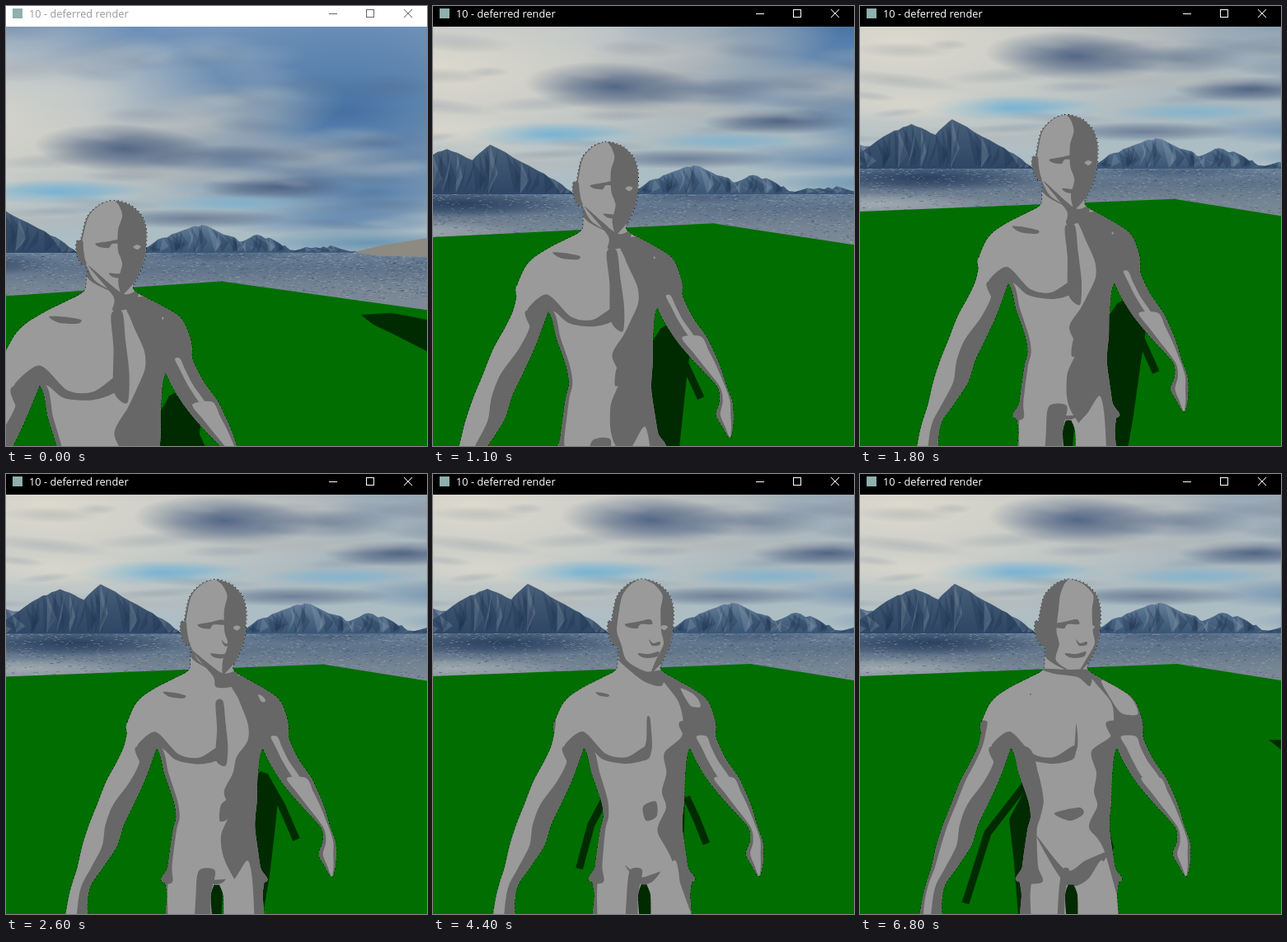
These frames come from a looping animation (511x533 px, 6900 ms). An HTML page with a canvas:

```html
<!DOCTYPE html>
<html>
<head>
<meta charset="utf-8">
<style>
html, body { margin: 0; width: 100%; height: 100%; overflow: hidden; background: #000; }
canvas { display: block; }
</style>
</head>
<body>
<canvas id="stage" width="511" height="533"></canvas>
<script>
const ctx = document.getElementById('stage').getContext('2d');
const LOOP = 6900, STEP = 100, FOCAL = 408, CX = 255.5, CY = 279, REST = 192;
const LIGHT = '#999a99', DARK = '#666766', GRASS = '#006e00', SHADE = '#002b00';

// time, yaw, height of the horizon on screen
const camKeys = [[0, .292, 298], [500, .292, 298], [600, .19, 262], [1100, .102, 227],
  [1800, .008, 196], [2700, 0, REST], [LOOP, 0, REST]];
let cam, light; // light runs from 0 to 1

const mix = (a, b, k) => a + (b - a) * k;
const clamp = k => Math.min(1, Math.max(0, k));
const linear = k => k, easeIn = k => k * k, easeOut = k => 1 - (1 - k) ** 2;
const pitchFor = horizon => Math.atan((horizon - CY) / FOCAL);

function camera(t) {
  const i = camKeys.findIndex(k => k[0] > t), a = camKeys[i - 1], b = camKeys[i];
  const k = (t - a[0]) / (b[0] - a[0]), yaw = mix(a[1], b[1], k), pitch = pitchFor(mix(a[2], b[2], k));
  return { sy: Math.sin(yaw), cy: Math.cos(yaw), sp: Math.sin(pitch), cp: Math.cos(pitch) };
}

// Points are given as seen by the camera at rest; turn them to the current view.
const S = Math.sin(pitchFor(REST)), C = Math.cos(pitchFor(REST));
function project(x, y) {
  const u = x - CX, v = CY - y;
  const h = v * C + FOCAL * S, d = FOCAL * C - v * S;
  const x2 = u * cam.cy - d * cam.sy, d2 = d * cam.cy + u * cam.sy;
  const depth = d2 * cam.cp + h * cam.sp;
  return [CX + FOCAL * x2 / depth, CY - FOCAL * (h * cam.cp - d2 * cam.sp) / depth];
}

function points(flat) {
  const out = [];
  for (let i = 0; i < flat.length; i += 2) out.push(project(flat[i], flat[i + 1]));
  return out;
}

function spline(flat, path = new Path2D()) {
  const p = points(flat), n = p.length, at = i => p[(i + n) % n];
  path.moveTo(...p[0]);
  for (let i = 0; i < n; i++) {
    const [a, b, c, d] = [at(i - 1), at(i), at(i + 1), at(i + 2)];
    path.bezierCurveTo(b[0] + (c[0] - a[0]) / 7, b[1] + (c[1] - a[1]) / 7,
      c[0] - (d[0] - b[0]) / 7, c[1] - (d[1] - b[1]) / 7, c[0], c[1]);
  }
  path.closePath();
  return path;
}

function trace(flat) {
  ctx.beginPath();
  points(flat).forEach(p => ctx.lineTo(...p));
}

function poly(flat, color) {
  trace(flat);
  ctx.fillStyle = color;
  ctx.fill();
}

const morph = (from, to, k) => from.map((v, i) => mix(v, to[i], k));

function random(seed) {
  return () => (seed = (seed * 16807) % 2147483647) / 2147483647;
}

function puff(x, y, rx, ry, rgb, alpha, tilt = 0) {
  const g = ctx.createRadialGradient(0, 0, 0, 0, 0, 1);
  g.addColorStop(0, `rgba(${rgb},${alpha})`);
  g.addColorStop(.5, `rgba(${rgb},${alpha * .6})`);
  g.addColorStop(1, `rgba(${rgb},0)`);
  ctx.save();
  ctx.translate(...project(x, y));
  ctx.rotate(tilt);
  ctx.scale(rx, ry);
  ctx.fillStyle = g;
  ctx.fillRect(-1, -1, 2, 2);
  ctx.restore();
}

function verticalFill(y0, y1, colors) {
  const g = ctx.createLinearGradient(0, project(255, y0)[1], 0, project(255, y1)[1]);
  colors.forEach((c, i) => g.addColorStop(i / (colors.length - 1), c));
  return g;
}

const BLUE = '64,112,166', CREAM = '222,218,206', SLATE = '78,98,130', CYAN = '110,176,212', GREY = '178,182,182';
const clouds = [
  [620, -50, 310, 140, BLUE, .95], [200, -115, 170, 45, BLUE, .45],
  [50, 40, 380, 150, CREAM, .95], [380, 5, 170, 50, GREY, .7, -.2], [560, 45, 150, 32, GREY, .7, .15],
  [650, 95, 130, 50, BLUE, .6], [265, 56, 110, 30, SLATE, .95, .05], [390, 60, 90, 18, SLATE, .5],
  [480, 96, 95, 16, SLATE, .95], [350, 86, 140, 13, GREY, .7], [190, 119, 110, 15, CYAN, .85],
  [410, 124, 100, 11, CYAN, .6], [60, 115, 120, 22, CREAM, .7], [560, 145, 150, 20, BLUE, .5],
  [350, 148, 120, 12, SLATE, .65], [150, 155, 150, 14, GREY, .6], [620, 178, 150, 16, '92,140,174', .8]
];

function sky() {
  ctx.fillStyle = verticalFill(-120, REST, ['#7f9cbd', '#9db0c0', '#b0b9bd', '#a9b8bf', '#aebfc6']);
  ctx.fillRect(0, 25, 511, 508);
  clouds.forEach(c => puff(...c));
  const r = random(77);
  for (let i = 0; i < 90; i++) {
    const y = -130 + r() * 300, rx = 25 + r() * 60;
    puff(-40 + r() * 780, y, rx, 4 + rx * (190 - y) / 1500, r() < .5 ? '212,212,206' : SLATE, .17, (r() - .5) * .2);
  }
}

function sea() {
  ctx.fillStyle = verticalFill(REST, 250, ['#6a8198', '#5f7389', '#748393', '#7d8995']);
  ctx.fillRect(0, project(255, REST)[1], 511, 533);
  puff(80, 204, 150, 17, '36,58,90', .9);
  puff(380, 197, 110, 8, '60,82,112', .6);
  puff(20, 236, 150, 14, '176,184,188', .7);
  const r = random(5);
  for (let i = 0; i < 2600; i++) {
    const [px, py] = project(-20 + r() * 800, 193 + r() ** 1.3 * 70);
    ctx.fillStyle = r() < .5 ? 'rgba(190,200,208,.25)' : 'rgba(40,60,90,.28)';
    ctx.fillRect(px, Math.round(py), 1 + r() * 3, 1);
  }
}

// A rough skyline through key points, with streaks of light and shade on its slopes.
function ridge(keys, seed, rough, colors) {
  const r = random(seed), flat = [];
  for (let i = 0; i + 3 < keys.length; i += 2)
    for (let j = 0; j < 5; j++)
      flat.push(mix(keys[i], keys[i + 2], j / 5), mix(keys[i + 1], keys[i + 3], j / 5) + (j && (r() - .5) * rough));
  flat.push(...keys.slice(-2));
  ctx.save();
  poly(flat, colors);
  ctx.clip();
  for (let i = 2; i < flat.length - 2; i += 2) {
    const x = flat[i], y = flat[i + 1], lean = (r() - .5) * 30;
    poly([x, y, x + lean, REST, x + lean + 4 + r() * 9, mix(y, REST, .6)],
      r() < .45 ? 'rgba(140,158,176,.3)' : 'rgba(28,48,78,.3)');
  }
  ctx.restore();
}

function mountains() {
  const near = verticalFill(133, REST, ['#4a6079', '#3a526d', '#2f4766']);
  const far = verticalFill(156, REST, ['#667e9a', '#4d6885', '#3b5675']);
  ridge([-60,193, 0,163, 24,168, 60,193], 9, 2, '#5d748d');
  ridge([-60,193, 0,176, 40,150, 66,139, 95,152, 115,133, 160,158, 190,175, 214,193], 3, 2, near);
  ridge([282,193, 312,174, 340,163, 363,156, 400,170, 416,178, 440,168, 470,178, 488,189, 530,185, 560,184, 604,193],
    11, 4, far);
  spread = [591,192, 650,181, 731,170, 820,166, 820,204, 720,200, 640,198];
  poly(spread, '#8d8a82');
}
let spread;

function groundShadows() {
  const away = easeOut(clamp(light * 1.4)), near = clamp((light - .45) / .55);
  const dx = -91 * clamp(light / .7), dy = 40 * easeIn(light);
  poly([587,282, 640,282, 703,295, 720,348, 691,339, 640,313, 605,296]
    .map((v, i) => v + (i % 2 ? dy : dx)), SHADE);
  poly(morph([302,375, 316,356, 330,358, 350,388, 344,425, 334,495, 322,560, 298,560],
    [295,375, 298,365, 300,370, 302,390, 302,425, 300,470, 296,500, 290,500], away), SHADE);
  poly(morph([215,410, 215,380, 215,430, 212,560, 212,560, 212,470],
    [181,418, 206,372, 215,430, 206,560, 194,560, 187,470], easeIn(near)), SHADE);
  ctx.strokeStyle = SHADE;
  ctx.lineWidth = 9;
  trace(morph([318,355, 342,395, 362,440], [298,425, 300,440, 304,455], light));
  ctx.stroke();
  trace(morph([220,390, 212,420, 205,455], [200,377, 155,435, 128,520], Math.sqrt(near)));
  ctx.stroke();
  poly([247,490, 264,492, mix(258, 272, light),560, 246,560], SHADE);
}

function ground() {
  const [l, top, r] = points([-150,251, 385,230, 850,304]);
  ctx.fillStyle = GRASS;
  ctx.beginPath();
  [l, top, r, [r[0], 900], [l[0], 900]].forEach(p => ctx.lineTo(...p));
  ctx.fill();
  groundShadows();
}

// Body parts as cross-sections: y, left, right.
const head = [[128,249,260], [134,236,275], [147,224,287], [165,219,292], [190,216,291], [206,222,288],
  [226,234,279], [241,258,266]];
const ear = [[179,213,219], [188,212,220], [200,215,222], [206,219,224]];
const torso = [[212,229,277], [236,223,276], [247,205,291], [257,185,309], [270,165,329], [285,154,338],
  [312,148,342], [331,183,312], [363,193,306], [395,204,305], [415,207,303], [432,203,303], [475,197,309], [495,196,311]];
const leftArm = [[300,149,190], [315,147,188], [331,143,183], [348,135,177], [372,122,168], [400,111,155],
  [425,101,143], [450,93,135], [476,87,118], [498,80,103], [520,75,99], [560,71,98]];
const rightArm = [[300,300,340], [318,305,343], [331,312,348], [348,320,357], [368,332,371], [385,345,379],
  [402,360,386], [428,383,394], [445,385,400], [460,380,401], [474,387,400], [486,394,397]];
const leftLeg = [[480,197,254], [510,196,249], [560,197,247]];
const rightLeg = [[480,256,310], [510,264,312], [560,269,311]];
const parts = [head, ear, torso, leftArm, rightArm, leftLeg, rightLeg];

// The band of a part between two fractions of its width.
function band(rows, from = () => 0, to = () => 1, path) {
  const left = rows.flatMap(([y, l, r], i) => [mix(l, r, from(i)), y]);
  const right = rows.map(([y, l, r], i) => [mix(l, r, to(i)), y]).reverse().flat();
  return spline(left.concat(right), path);
}

// Shadows that change with the light: start, end, pace, fixed rest.
const flankRest = [330,560, 312,330, 350,305, 335,250];
const moving = [
  [[270,248, 274,272, 288,305, 289,325, 280,345, 271,362, 257,385, 266,412, 254,445, 262,491],
   [279,240, 304,275, 308,295, 305,317, 281,336, 287,362, 284,385, 288,402, 278,428, 296,455], easeOut, flankRest],
  [[252,264, 264,262, 268,295, 272,330, 270,358, 256,345, 255,300],
   [262,305, 263,305, 264,315, 264,330, 260,340, 252,346, 260,330], easeOut],
  [[226,208, 264,241, 282,238, 276,256, 254,260, 254,244],
   [220,236, 252,237, 280,238, 279,257, 264,246, 236,242], linear],
  [[262,400, 272,394, 272,415, 260,420], [236,411, 266,404, 271,412, 255,420], easeIn],
  [[240,487, 252,491, 264,491, 266,491, 262,495, 252,496],
   [214,438, 250,480, 274,468, 302,458, 278,490, 250,497], easeIn],
  [[188,263, 203,264, 220,268, 217,272, 198,270], [206,266, 207,266, 208,267, 207,268, 206,267], linear]
];
const fixed = [
  [160,328, 182,312, 210,339, 235,343, 260,329, 259,345, 235,351, 207,346, 190,332, 172,330], // chest
  [233,182, 248,179, 263,176, 266,182, 252,182, 248,187, 238,186],                           // brow
  [262,200, 267,205, 275,203, 275,207, 266,208],                                             // nose
  [249,217, 262,218, 274,215, 272,221, 260,223, 252,221]                                     // mouth
];

function shadeBody() {
  const grow = easeIn(light);
  const fill = path => ctx.fill(path);
  ctx.fillStyle = DARK;
  fill(band(head, i => mix(.58, .9, easeOut(light)) - .05 * Math.cos(i * 1.9)));
  fill(band(head, () => -.1, i => mix(.02, .3, grow) * (i < 6 ? 1 : .3)));
  fill(band(ear));
  fill(band(leftArm.slice(2), i => .53 + .2 * Math.sin(i * 1.6 - .8) * clamp(1 - i / 7)));
  fill(band(leftArm, () => -.1, () => .18 * grow - .05));
  fill(band(rightArm));
  fill(band(torso.slice(7), () => -.2, i => .04 + grow * (.12 + .05 * Math.sin(i * 1.3))));
  fill(band(leftLeg, i => mix(.62, .85, light)));
  fill(band(leftLeg, () => -.1, () => .2 * grow));
  moving.forEach(([a, b, ease, rest = []]) => fill(spline(morph(a, b, ease(light)).concat(rest))));
  fixed.forEach(f => fill(spline(f)));

  ctx.fillStyle = LIGHT;
  const open = .08 + .16 * light;
  fill(band(rightArm.slice(1, 5), () => .55 - open, () => .55 + open));
  fill(band(rightArm.slice(4), () => .24, () => .84));
  fill(spline([268,560, 264,510, 280,487, 294,468, 300,500, 299,560]));
  fill(spline(morph([309,270, 310,270, 311,271, 311,272, 310,273, 309,272],
    [293,250, 318,261, 332,275, 337,291, 318,290, 306,275], light)));
  fill(spline([276,186, 280,183, 285,185, 281,189]));
}

function figure() {
  const body = new Path2D();
  parts.forEach(rows => band(rows, undefined, undefined, body));
  ctx.strokeStyle = '#000';
  ctx.lineWidth = 1.6;
  ctx.setLineDash([1.2, 3.5]);
  ctx.stroke(body);
  ctx.setLineDash([]);
  ctx.fillStyle = LIGHT;
  ctx.fill(body);
  ctx.save();
  ctx.clip(body);
  shadeBody();
  ctx.restore();
}

function titleBar(active) {
  ctx.fillStyle = active ? '#000' : '#fff';
  ctx.fillRect(0, 0, 511, 25);
  ctx.fillStyle = '#8fb0ac';
  ctx.fillRect(8, 3, 12, 12);
  ctx.fillStyle = active ? '#fff' : '#999';
  ctx.font = '12.8px "Open Sans", "Noto Sans", sans-serif';
  ctx.fillText('10 - deferred render', 28, 14);
  ctx.strokeStyle = active ? '#fff' : '#666';
  ctx.lineWidth = 1;
  ctx.strokeRect(437.5, 4.5, 9, 9);
  ctx.beginPath();
  ctx.moveTo(392, 9.5); ctx.lineTo(402, 9.5);
  ctx.moveTo(483, 4); ctx.lineTo(493, 14);
  ctx.moveTo(493, 4); ctx.lineTo(483, 14);
  ctx.stroke();
}

function draw(t) {
  if (t > 200 && t < 600) t = 200;
  cam = camera(t);
  light = clamp((t - 1800) / 5000);
  sky();
  sea();
  mountains();
  ground();
  figure();
  titleBar(t >= 100);
}

let last = -1;
function tick() {
  const t = Math.floor(performance.now() % LOOP / STEP) * STEP;
  if (t !== last) draw(last = t);
  requestAnimationFrame(tick);
}
tick();
</script>
</body>
</html>
```
